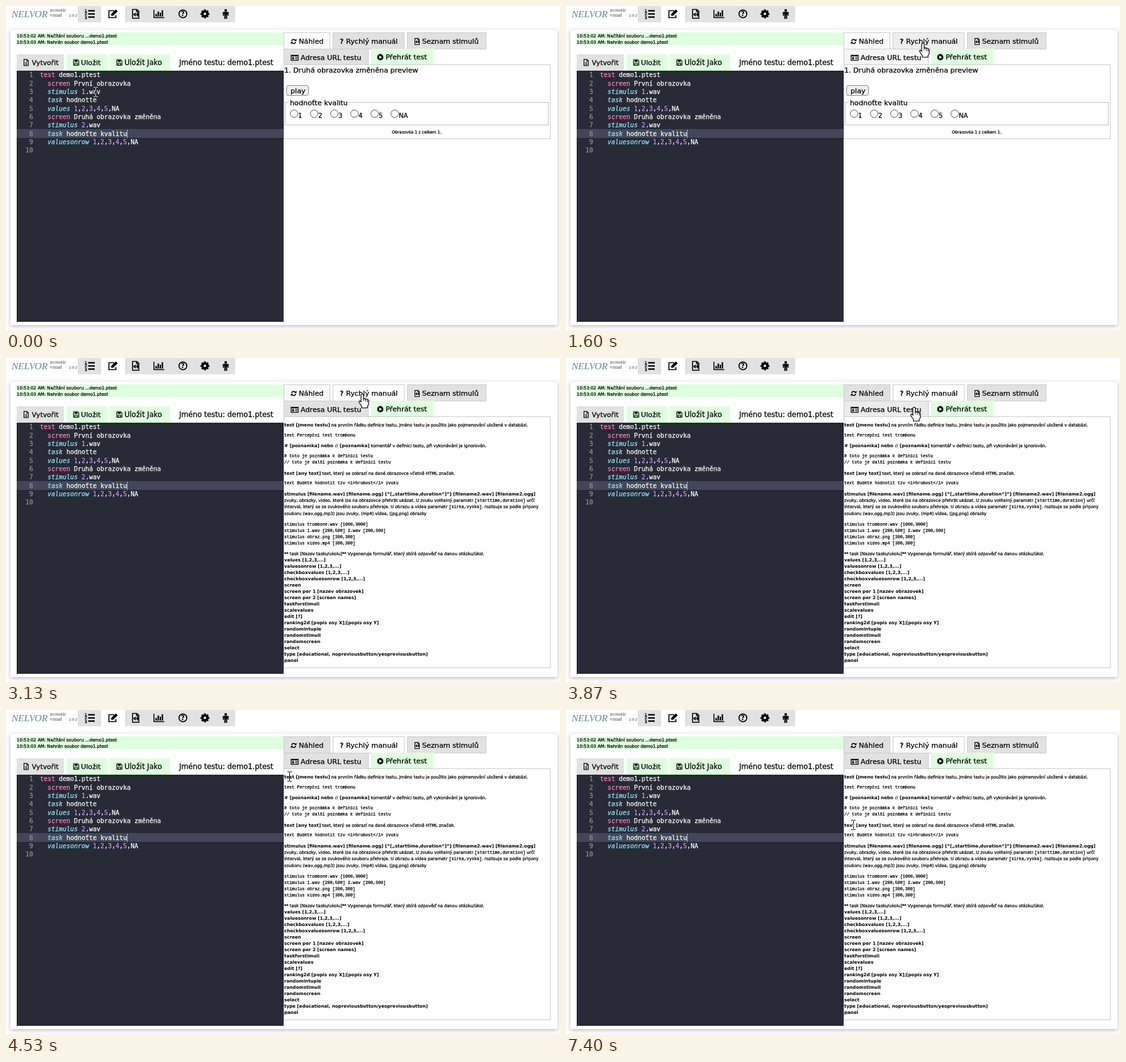
These frames come from a looping animation (880 by 516 pixels, 8000 ms). An HTML page with a canvas:

```html
<!DOCTYPE html>
<html lang="cs">
<head>
<meta charset="utf-8">
<title>Test editor</title>
<style>
html, body { margin: 0; width: 100%; height: 100%; overflow: hidden; background: #fff; }
canvas { display: block; }
</style>
</head>
<body>
<canvas id="stage" width="880" height="516"></canvas>
<script>
const ctx = document.getElementById('stage').getContext('2d');
const LOOP = 8000, FPS = 15;

const SANS = '"DejaVu Sans", Verdana, sans-serif';
const SERIF = '"Liberation Serif", serif';
const UI = `11.2px ${SANS}`;
const BODY = `6.72px ${SANS}`;
const BOLD = `bold 7.1px ${SANS}`;
const CODE = '6.72px "Liberation Mono", monospace';
const EDIT = '9.97px "DejaVu Sans Mono", monospace';
const GREY = '#e1e1e1', GREEN = '#ddffdd', LINE = '#cccccc';

function rect(x, y, w, h, color) {
  ctx.fillStyle = color;
  ctx.fillRect(x, y, w, h);
}

function frame(x, y, w, h, color) {
  ctx.strokeStyle = color;
  ctx.lineWidth = 1;
  ctx.strokeRect(x + .5, y + .5, w - 1, h - 1);
}

// Draws text and returns the x where it ends; a hairline firms up thin small type.
function text(str, x, y, font = UI, color = '#000') {
  ctx.font = font;
  ctx.fillStyle = ctx.strokeStyle = color;
  ctx.fillText(str, x, y);
  if (!/bold|Serif/.test(font)) {
    ctx.lineWidth = .25;
    ctx.strokeText(str, x, y);
  }
  return x + ctx.measureText(str).width;
}

function flow(x, y, ...runs) {
  for (const [font, str] of runs) x = text(str, x, y, font);
}

function arc(x, y, r, a = 0, b = Math.PI * 2) {
  ctx.beginPath();
  ctx.arc(x, y, r, a, b);
}

function poly(...p) {
  ctx.beginPath();
  for (let i = 0; i < p.length; i += 2) ctx.lineTo(p[i], p[i + 1]);
}

function sheet() {
  poly(-5, -7, 2, -7, 5, -4, 5, 7, -5, 7);
  ctx.closePath();
  ctx.stroke();
  poly(1.5, -7, 1.5, -3.5, 5, -3.5);
  ctx.stroke();
}

// Icons on a grid of about 16 units around the origin.
const icons = {
  list() {
    ctx.font = `bold 6.5px ${SANS}`;
    for (let i = 0; i < 3; i++) {
      ctx.fillText(i + 1, -8.5, -2.7 + i * 5.4);
      ctx.fillRect(-2.5, -6 + i * 5, 10.5, 2.3);
    }
  },
  edit() {
    ctx.lineWidth = 1.7;
    poly(2, -5, -6.5, -5, -6.5, 6, 4.5, 6, 4.5, 2);
    ctx.stroke();
    poly(-3, 3.2, -2.6, -.2, 4.5, -7, 7.4, -4, .4, 3);
    ctx.fill();
  },
  audio() {
    sheet();
    poly(-3.5, -.5, -2, -.5, 0, -2.5, 0, 4.5, -2, 2.5, -3.5, 2.5);
    ctx.fill();
    for (const r of [1.8, 3.6]) { arc(0, 1, r, -.9, .9); ctx.stroke(); }
  },
  sheet() {
    sheet();
    for (const y of [-1, 1.7, 4.4]) ctx.fillRect(-3, y, 6, 1.2);
  },
  chart() {
    poly(-8, -6.5, -8, 6, 8.5, 6);
    ctx.stroke();
    [4, 8, 6, 10].forEach((h, i) => ctx.fillRect(-5.6 + i * 3.3, 4.2 - h, 2.2, h));
  },
  help() {
    ctx.lineWidth = 1.7;
    arc(0, 0, 6.2);
    ctx.stroke();
    ctx.font = `bold 10px ${SANS}`;
    ctx.fillText('?', -2.9, 3.7);
  },
  gear() {
    for (let i = 0; i < 8; i++) {
      ctx.rotate(Math.PI / 4);
      ctx.fillRect(-1.6, -7, 3.2, 4);
    }
    ctx.lineWidth = 3.4;
    arc(0, 0, 3.8);
    ctx.stroke();
  },
  person() {
    arc(0, -5.6, 2.1);
    ctx.fill();
    ctx.fillRect(-4.5, -3, 9, 2);
    ctx.fillRect(-4.5, -2, 1.8, 5);
    ctx.fillRect(2.7, -2, 1.8, 5);
    ctx.fillRect(-2.3, -3, 4.6, 6);
    ctx.fillRect(-2.3, 3, 2, 5);
    ctx.fillRect(.3, 3, 2, 5);
  },
  refresh() {
    ctx.lineWidth = 2.3;
    for (let i = 0; i < 2; i++) {
      arc(0, 0, 4.9, Math.PI * 1.05, Math.PI * 1.75);
      ctx.stroke();
      poly(6.8, -7, 6.8, -1, 1, -1);
      ctx.fill();
      ctx.rotate(Math.PI);
    }
  },
  card() {
    ctx.strokeRect(-7.5, -5.5, 15, 11);
    ctx.fillRect(-7.5, -5.5, 15, 2.2);
    arc(-3.4, -.6, 1.7);
    ctx.fill();
    ctx.fillRect(-5.7, 1.2, 4.6, 2.3);
    ctx.fillRect(1, -1.5, 5, 1.4);
    ctx.fillRect(1, 1.5, 5, 1.4);
  },
  play() {
    arc(0, 0, 7);
    ctx.fill();
    ctx.fillStyle = GREEN;
    poly(-2.2, -4, 4.2, 0, -2.2, 4);
    ctx.fill();
  },
  disk() {
    poly(-6, -6, 3.5, -6, 6, -3.5, 6, 6, -6, 6);
    ctx.closePath();
    ctx.stroke();
    ctx.fillRect(-3.5, -6, 6.5, 4.5);
    ctx.strokeRect(-3.5, 1.5, 7, 4.5);
  }
};

function icon(name, x, y, scale = 1) {
  ctx.save();
  ctx.translate(x, y);
  ctx.scale(scale, scale);
  ctx.fillStyle = ctx.strokeStyle = '#000';
  ctx.lineWidth = 1.5;
  icons[name]();
  ctx.restore();
}

function header() {
  text('NELVOR', 9, 18, `italic 15.4px ${SERIF}`, '#6b8288');
  text('acoustic', 70, 9, `7.9px ${SERIF}`, '#444');
  text('visual', 70, 17, `7.9px ${SERIF}`, '#444');
  text('2.0.2', 100, 17, `6.5px ${SERIF}`, '#333');
  rect(114, 0, 250, 26, GREY);
  rect(151, 0, 38, 26, '#fff');
  const bar = { list: 133, edit: 170, audio: 206, chart: 243, help: 281, gear: 316, person: 349 };
  for (const name in bar) icon(name, bar[name], 12.5);
}

function card() {
  ctx.save();
  ctx.shadowOffsetY = 2;
  for (const [blur, alpha] of [[10, .12], [5, .16]]) {
    ctx.shadowBlur = blur;
    ctx.shadowColor = `rgba(0,0,0,${alpha})`;
    rect(7, 38, 869, 470, '#fff');
  }
  ctx.restore();

  rect(17, 42, 424, 20, GREEN);
  const log = `6.9px ${SANS}`;
  text('10:53:02 AM: Načítání souboru ...demo1.ptest', 17, 50, log);
  text('10:53:03 AM: Nahrán soubor demo1.ptest', 17, 60, log);

  rect(17, 77, 75, 26, GREY);
  rect(96, 77, 65, 26, GREEN);
  rect(165, 77, 95, 26, GREEN);
  icon('sheet', 32, 90, .7);
  icon('disk', 111.5, 90, .7);
  icon('disk', 180, 90, .7);
  text('Vytvořit', 41, 94, `10.8px ${SANS}`);
  text('Uložit', 119, 94);
  text('Uložit Jako', 188, 94, `11.5px ${SANS}`);
  text('Jméno testu: demo1.ptest', 275, 94, `11.5px ${SANS}`);
}

const script = [
  'test demo1.ptest',
  '  screen První obrazovka',
  '  stimulus 1.wav',
  '  task hodnotte',
  '  values 1,2,3,4,5,NA',
  '  screen Druhá obrazovka změněna',
  '  stimulus 2.wav',
  '  task hodnoťte kvalitu',
  '  valuesonrow 1,2,3,4,5,NA',
  ''
];

function editor() {
  const step = 40 / 3;
  rect(17, 103, 424, 400, '#282a36');
  rect(17, 196, 424, 14, '#44475a');
  script.forEach((row, i) => {
    const y = Math.ceil(112.8 + i * step);
    ctx.textAlign = 'right';
    text(i + 1, 43, y, EDIT, '#909194');
    ctx.textAlign = 'left';
    const [, pad, word, rest] = row.match(/^( *)(\w*)(.*)$/);
    const main = word === 'test' || word === 'screen';
    let x = text(word, 54 + pad.length * 6, y, main ? EDIT : 'italic ' + EDIT, main ? '#ff79c6' : '#8be9fd');
    for (const part of rest.split(/(\b\d\b)/))
      x = text(part, x, y, EDIT, /^\d$/.test(part) ? '#bd93f9' : '#f8f8f2');
  });
  rect(192, 197, 1, 13, '#b4b5ba');
}

const clamp = v => Math.max(0, Math.min(1, v));
const ramp = (k, a, b) => clamp((k - a) / (b - a));
const shade = light => {
  const v = Math.round(225 + 30 * light);
  return `rgb(${v},${v},${v})`;
};

function tab(x, y, w, h, fill) {
  rect(x, y, w, h, fill);
  frame(x, y, w, h, LINE);
}

function tabs(k) {
  const home = 1 - ramp(k, 46, 50);
  const help = ramp(k, 22.5, 26);
  const link = Math.max(
    Math.min(ramp(k, 19, 22), 1 - ramp(k, 22.5, 27)),
    Math.min(ramp(k, 57, 60), 1 - ramp(k, 59, 64)));
  tab(441, 42, 74, 27, shade(home));
  tab(519, 42, 114, 27, shade(help));
  tab(637, 42, 126, 27, shade(0));
  tab(441, 68, 135, 26, shade(link));
  rect(580, 68, 99, 25, GREEN);
  icon('refresh', 457, 56.5, .65);
  icon('audio', 653, 56.5, .7);
  icon('card', 458.5, 82.5, .75);
  icon('play', 594.5, 81.5, .7);
  text('?', 530, 60, `bold 11px ${SANS}`);
  text('Náhled', 465, 60);
  text('Rychlý manuál', 540, 60);
  text('Seznam stimulů', 661, 60);
  text('Adresa URL testu', 468, 86);
  text('Přehrát test', 603, 85);
}

function preview() {
  frame(441, 93, 424, 119, LINE);
  text('1. Druhá obrazovka změněna preview', 442, 106);

  ctx.beginPath();
  ctx.roundRect(445.5, 126.5, 35, 16, 3);
  ctx.fillStyle = '#efefef';
  ctx.strokeStyle = '#8a8a8a';
  ctx.lineWidth = 1;
  ctx.fill();
  ctx.stroke();
  text('play', 452, 139);

  frame(443, 153, 419, 37, '#c0c0c0');
  rect(449, 152, 95, 3, '#fff');
  text('hodnoťte kvalitu', 451, 158);
  ['1', '2', '3', '4', '5', 'NA'].forEach((label, i) => {
    const x = 457.5 + i * 32;
    arc(x, 171.5, 6);
    ctx.strokeStyle = '#555';
    ctx.lineWidth = 1;
    ctx.stroke();
    text(label, x + 6.5, 178, `10px ${SANS}`);
  });
  text('Obrazovka 1 z celkem 1.', 613, 203, `6.4px ${SANS}`);
}

const commands = [
  'values [1,2,3,...]', 'valuesonrow [1,2,3,...]', 'checkboxvalues [1,2,3,...]',
  'checkboxvaluesonrow [1,2,3,...]', 'screen', 'screen per 1 [nazev obrazovek]',
  'screen per 2 [screen names]', 'taskforstimuli', 'scalevalues', 'edit [?]',
  'ranking2d [popis osy X];[popis osy Y]', 'randomintuple', 'randomstimuli',
  'randomscreen', 'select', 'type [educational, nopreviousbutton/yespreviousbutton]', 'panel'
];

function manual() {
  frame(441, 93, 424, 401, LINE);
  const x = 442;
  flow(x, 109, [BOLD, 'test [jmeno testu]'], [BODY, ' na prvním řádku definice testu, jméno testu je použito jako pojmenování uložené v databázi.']);
  flow(x, 125, [CODE, 'test Percepční test trombonu']);
  flow(x, 142, [BOLD, '# [poznamka] nebo // [poznamka]'], [BODY, ' komentář v definici testu, při vykonávání je ignorován.']);
  flow(x, 158, [CODE, '# toto je poznámka k definici testu']);
  flow(x, 168, [CODE, '// toto je další poznámka k definici testu']);
  flow(x, 186, [BOLD, 'text [any text]'], [BODY, ' text, který se zobrazí na dané obrazovce včetně HTML značek.']);
  flow(x, 201, [CODE, 'text Budete hodnotit tzv <i>hrubost</i> zvuku']);
  flow(x, 218.5, [BOLD, 'stimulus [filename.wav] [filename.ogg] [“[„starttime,duration“]“] [filename2.wav] [filename2.ogg]']);
  flow(x, 229, [BODY, 'zvuky, obrazky, video, které lze na obrazovce přehrát ukázat. U zvuku volitelný parametr '], [CODE, '[starttime,duration]'], [BODY, ' určí']);
  flow(x, 239, [BODY, 'interval, který se ze zvukového souboru přehraje. U obrazu a videa parametr '], [CODE, '[sirka,vyska]'], [BODY, '. rozlisuje se podle pripony']);
  flow(x, 250, [BODY, 'souboru (wav,ogg,mp3) jsou zvuky, (mp4) videa, (jpg,png) obrazky']);
  ['trombone.wav [1000,3000]', '1.wav [200,500] 2.wav [200,500]', 'obraz.png [300,300]', 'video.mp4 [300,300]']
    .forEach((s, i) => text('stimulus ' + s, x, 267 + i * 10, CODE));
  flow(x, 314, [BODY, '** task [Nazev tasku/ukolu]** Vygeneruje formulář, který sbírá odpověď na danou otázku/úkol.']);
  commands.forEach((s, i) => text(s, x, 324 + i * 10, BOLD));
}

// Pointer track: tick, x, y.
const track = [
  [0, 142, 137], [1, 142, 138], [13, 142, 138], [14, 146, 144], [16, 185, 157],
  [18, 300, 150], [20, 425, 115], [22, 530, 80], [23, 558, 66], [24, 567, 59],
  [26, 565, 53], [27, 566, 57], [55, 566, 57], [56, 565, 62], [58, 553, 78],
  [60, 522, 102], [62, 476, 110], [64, 452, 111], [66, 446, 108], [68, 450, 106],
  [83, 450, 106], [85, 454, 114], [88, 462, 137], [90, 461, 143], [92, 457, 139],
  [103, 457, 139], [105, 459, 155], [108, 462, 187], [111, 456, 183], [120, 456, 183]
];

const handPath = new Path2D('M-2 1.5Q0-1 2 1.5V8Q4 6.5 5 8.5Q7 7.5 8 9.5Q10 9 10 11V15Q10 18 8 20V22.5H-1V20L-5 14Q-6 11-3.5 11.5L-2 13Z');
const arrowPath = new Path2D('M0 0V16L3.7 12.5L6.2 18L8.6 17L6.2 11.6H11.2Z');

function pointer(k) {
  const n = Math.max(1, track.findIndex(p => p[0] >= k));
  const [a, ax, ay] = track[n - 1], [b, bx, by] = track[n];
  const f = (k - a) / (b - a);
  const x = Math.round(ax + (bx - ax) * f), y = Math.round(ay + (by - ay) * f);

  ctx.save();
  ctx.translate(x, y);
  if (x < 441 || (y > 93 && k > 46)) {
    ctx.globalCompositeOperation = 'difference';
    for (const row of [-8, 7]) {
      rect(-3, row, 3, 1, '#fff');
      rect(1, row, 3, 1, '#fff');
    }
    rect(0, -7, 1, 14, '#fff');
  } else {
    const shape = y > 93 ? arrowPath : handPath;
    ctx.fillStyle = '#fff';
    ctx.strokeStyle = '#000';
    ctx.lineWidth = 1.2;
    ctx.lineJoin = 'round';
    ctx.fill(shape);
    ctx.stroke(shape);
    if (shape === handPath) {
      ctx.lineWidth = 1;
      for (const [lx, ly] of [[2, 7], [5, 8.5], [8, 9.5]]) {
        poly(lx, ly, lx, ly + 4);
        ctx.stroke();
      }
    }
  }
  ctx.restore();
}

function draw(k) {
  rect(0, 0, 880, 516, '#fff');
  header();
  card();
  editor();
  if (k > 46) manual(); else preview();
  tabs(k);
  pointer(k);
}

const start = performance.now();
let shown = -1;

function tick() {
  const t = (performance.now() - start) % LOOP;
  const k = Math.floor((t + 4) * FPS / 1000) % (LOOP * FPS / 1000);
  if (k !== shown) draw(shown = k);
  requestAnimationFrame(tick);
}
tick();
</script>
</body>
</html>
```
